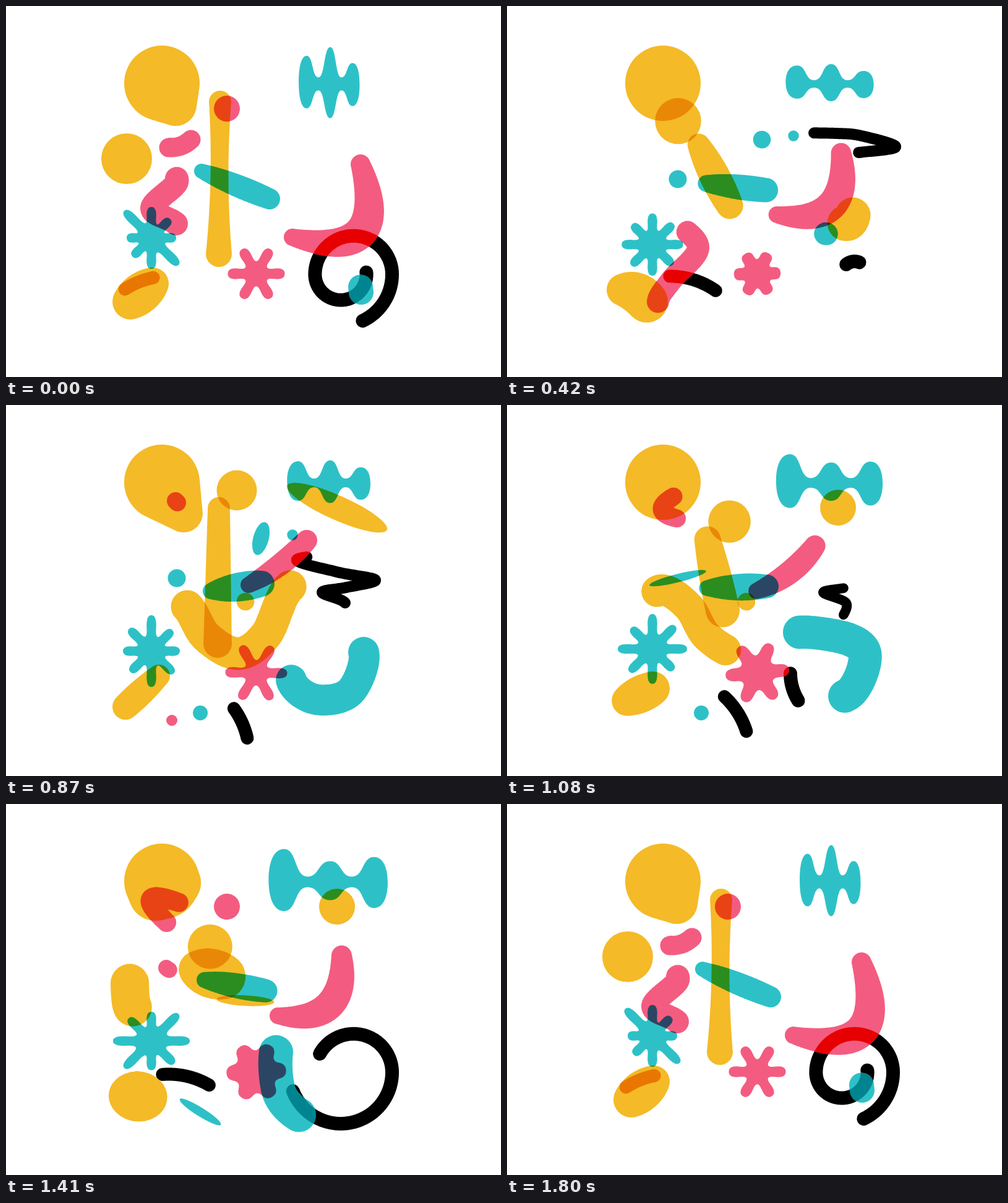
Write an HTML page with a canvas that moves like this. It is 800 px wide and 600 px high and loops after 1.83 s.

```html
<!DOCTYPE html>
<html lang="en">
<head>
<meta charset="utf-8">
<title>Wobbling shapes</title>
<style>
  html, body { margin: 0; width: 100%; height: 100%; overflow: hidden; background: #fff; }
  canvas { display: block; }
</style>
</head>
<body>
<canvas id="stage" width="800" height="600"></canvas>
<script>
const STEP = 30, STEPS = 61, CYCLE = 1800;
const BEATS = [0, 240, 630, 870, 1290, 1560];
const YELLOW = '#f4ba27', PINK = '#f35c80', TEAL = '#2dc1c7';
const { PI, sin, cos, min, max, abs, floor, hypot, exp } = Math;
const RAD = PI / 180;

const stage = document.getElementById('stage').getContext('2d');
const ink = new OffscreenCanvas(800, 600).getContext('2d');
const shapes = [];   // { color, build(path, t) }
const strokes = [];  // { track, pose }

const lerp = (a, b, u) => a + (b - a) * u;
const middle = (a, b) => a.map((v, i) => (v + b[i]) / 2);

// Monotone interpolation of keys [time, ...values]; null outside their life.
function at(keys, t) {
  const last = keys.length - 1;
  if (t < keys[0][0]) t += CYCLE;
  if (t < keys[0][0] || t > keys[last][0]) return null;
  const wraps = keys[last][0] - keys[0][0] === CYCLE;
  let i = 0;
  while (i < last - 1 && keys[i + 1][0] <= t) i++;
  const slope = (j, k) => {
    if (j < 0 || j >= last) {
      if (!wraps) return 0;
      j = (j + last) % last;
    }
    return (keys[j + 1][k] - keys[j][k]) / (keys[j + 1][0] - keys[j][0]);
  };
  const tangent = (j, k) => {
    const a = slope(j - 1, k), b = slope(j, k);
    return a * b <= 0 ? 0 : 2 * a * b / (a + b);
  };
  const a = keys[i], b = keys[i + 1];
  const d = b[0] - a[0], u = (t - a[0]) / d, v = 1 - u;
  return a.slice(1).map((p, n) => {
    const k = n + 1;
    return p * v * v * (1 + 2 * u) + b[k] * u * u * (3 - 2 * u)
      + d * u * v * (v * tangent(i, k) - u * tangent(i + 1, k));
  });
}

const life = (...keys) => t => at(keys, t);

// One pose per beat, repeating for ever.
const cycle = (...poses) =>
  life(...poses.map((p, i) => [BEATS[i], ...p]), [CYCLE, ...poses[0]]);

// Catmull-Rom track through points.
const through = (...pts) => u => {
  const i = max(0, min(floor(u), pts.length - 2)), f = u - i;
  const a = pts[max(i - 1, 0)], b = pts[i], c = pts[i + 1], d = pts[min(i + 2, pts.length - 1)];
  return b.map((p, k) => p + f / 2 * (c[k] - a[k]
    + f * (2 * a[k] - 5 * p + 4 * c[k] - d[k]
    + f * (3 * (p - c[k]) + d[k] - a[k]))));
};

function addDisk(path, x, y, r) {
  if (r <= 0) return;
  path.moveTo(x + r, y);
  path.arc(x, y, r, 0, 7);
}

// Union of disks; spine(u) gives [x, y, r] for u in 0..1.
function addBody(path, spine) {
  for (let i = 0; i <= 56; i++) addDisk(path, ...spine(i / 56));
}

function add(color, pose, build) {
  shapes.push({ color, build(path, t) {
    const v = pose(t);
    if (v) build(path, v);
  } });
}

// Bent bean: two ends with radii, swelling of the middle, sideways bend.
function bean(color, pose) {
  add(color, pose, (path, [x0, y0, r0, x1, y1, r1, belly, bend = 0]) => {
    const k = bend / (hypot(x1 - x0, y1 - y0) || 1);
    const a = [x0, y0, r0], b = [x1, y1, r1];
    const m = [(x0 + x1) / 2 + k * (y1 - y0), (y0 + y1) / 2 - k * (x1 - x0), (r0 + r1) / 2 * belly];
    addBody(path, u => a.map((p, i) =>
      p * (1 - u) * (1 - 2 * u) + 4 * m[i] * u * (1 - u) + b[i] * u * (2 * u - 1)));
  });
}

// Snake on a fixed track; pose: from, to, radius.
function snake(color, track, pose) {
  add(color, pose, (path, [from, to, r]) =>
    addBody(path, u => [...track(lerp(from, to, u)), r]));
}

const crawl = (track, pose) => strokes.push({ track, pose });

// Dot that opens from a thin sliver and closes the same way.
function pop(color, x, y, r, tilt, born, dies) {
  shapes.push({ color, build(path, t) {
    const grow = min(1, (t - born) / 150, (dies - t) / 150);
    if (grow <= 0) {
      if (dies > CYCLE && t + CYCLE < dies) this.build(path, t + CYCLE);
      return;
    }
    path.ellipse(x, y, r * (grow + 2.8 * sin(PI * grow)), r * grow, tilt * RAD, 0, 7);
  } });
}

// Rounded star; the first arm points along rot.
function addStar(path, cx, cy, arms, inner, w, rot) {
  const half = PI / arms.length, ctrl = [];
  arms.forEach((len, i) => {
    const a = rot + 2 * half * i, c = cos(a), s = sin(a);
    const put = (x, y) => [cx + x * c - y * s, cy + x * s + y * c];
    ctrl.push(put(len, -w), put(len, w), put(inner * cos(half), inner * sin(half)));
  });
  path.moveTo(...middle(ctrl.at(-1), ctrl[0]));
  ctrl.forEach((p, i) => path.quadraticCurveTo(...p, ...middle(p, ctrl[(i + 1) % ctrl.length])));
  path.closePath();
}

// Three lobes joined by necks, mirrored top to bottom.
function addComb(path, [spread, outer, inner]) {
  const lobes = [
    { x: 524 - spread, y: 123, h: outer },
    { x: 524, y: 124, h: inner },
    { x: 524 + spread * 0.95, y: 127, h: outer * 0.82 }];
  const neck = 0.105 * (outer + inner);
  let x = lobes[0].x, y = lobes[0].y - outer;
  const wave = (nx, ny) => {
    const h = (nx - x) * 0.55;
    path.bezierCurveTo(x + h, y, nx - h, ny, nx, ny);
    [x, y] = [nx, ny];
  };
  const run = (list, dir) => list.forEach((lobe, i) => {
    if (!i) return;
    wave((x + lobe.x) / 2, 126 + dir * neck);
    wave(lobe.x, lobe.y + dir * lobe.h);
  });
  const side = (width, ny) => {
    const edge = x + width, near = x + width * 0.7, mid = (y + ny) / 2;
    path.bezierCurveTo(near, y, edge, lerp(y, mid, 0.45), edge, mid);
    path.bezierCurveTo(edge, lerp(ny, mid, 0.45), near, ny, x, ny);
    y = ny;
  };
  path.moveTo(x, y);
  run(lobes, -1);
  side(spread * 0.3, lobes[2].y + lobes[2].h);
  // The way back starts at the last lobe, so halve the steps from there.
  run(lobes.reverse(), 1);
  side(-spread * 0.34, lobes[2].y - outer);
  path.closePath();
}

// Large disk whose bulges swell one after another: time, x, y, r
const bulges = [
  [0, 274, 160, 34], [240, 297, 130, 27], [870, 287, 175, 31],
  [1290, 308, 131, 25], [1290, 228, 173, 35]];
shapes.push({ color: YELLOW, build(path, t) {
  addDisk(path, 252, 125, 61);
  for (const [peak, x, y, r] of bulges) {
    const away = (t - peak + CYCLE * 1.5) % CYCLE - CYCLE / 2;
    const swell = exp(-((away / 130) ** 2));
    const tip = [lerp(252, x, swell), lerp(125, y, swell), lerp(50, r, swell)];
    addBody(path, u => [252, 125, 61].map((v, i) => lerp(v, tip[i], u)));
  }
} });

// Yellow: a roaming disk, the snake that becomes it, a bar and an egg
add(YELLOW, life(
  [0, 195, 247, 41], [240, 202, 233, 41], [630, 368, 138, 32.5], [870, 373, 138, 32.5],
  [1290, 339, 239, 36], [1560, 323, 219, 36], [1740, 330, 250, 0]),
  (path, disk) => addDisk(path, ...disk));
snake(YELLOW, through(
  [561, 332], [543, 350], [465, 291], [420, 372], [375, 402],
  [324, 375], [293, 326], [249, 299], [205, 329], [200, 237], [195, 247]),
  life([120, 0, 0, 0], [240, 0, 0, 31], [630, 1, 3.05, 26], [870, 2.1, 6, 26.5],
    [1290, 7, 8, 24], [1560, 9, 9, 41], [1799, 10, 10, 41]));
bean(YELLOW, cycle(
  [346, 155, 18, 344, 401, 21, 0.75], [342, 188, 23, 341, 369, 23, 1.25],
  [273, 253, 12, 384, 284, 20, 1.2], [344, 167, 18, 342, 386, 23, 1],
  [304, 268, 25, 355, 278, 33, 1.15], [322, 266, 35, 344, 283, 40, 1.2]));
const egg = [187, 459, 26, 226, 478, 34, 1.1, 5];
bean(YELLOW, cycle(
  [201, 478, 29, 237, 449, 26, 1.2, 0], egg, egg, [193, 488, 21, 247, 438, 18, 1.1, 0],
  [195, 468, 30, 224, 479, 37, 1.2, 0], [201, 477, 33, 227, 463, 33, 1.18, 0]));

// Pink: elbow, curl, wanderer
const elbow = [566, 250, 16, 456, 367, 14, 1.75, 75];
bean(PINK, cycle(
  [573, 256, 16, 463, 374, 14, 1.75, 75], elbow, [503, 224, 17, 408, 300, 13, 1.35, 13],
  [486, 219, 17, 392, 291, 13, 1.2, 5], [521, 241, 17, 424, 321, 13, 1.4, 19], elbow));
bean(PINK, life(
  [780, 275, 156, 0, 276, 157, 0, 1, 0], [870, 274, 155, 14, 277, 158, 14, 1, 0],
  [1290, 275, 212, 15, 261, 138, 15, 1.1, 42], [1560, 238, 163, 16, 305, 197, 16, 1.05, 35],
  [1800, 263, 229, 15.5, 299, 216, 15.5, 1, -4], [2040, 225, 207, 11.5, 231, 218, 11.5, 1.05, 0],
  [2160, 222, 205, 0, 222, 206, 0, 1, 0]));
snake(PINK, through(
  [259, 265], [276, 285], [236, 327], [275, 352], [309, 392],
  [266, 443], [244, 478], [258, 505], [268, 510]),
  life([1200, 0, 0, 0], [1290, 0, 0, 7], [1560, 0, 1, 17.5], [1800, 0.8, 3, 19],
    [2040, 2, 5, 18.5], [2430, 5.35, 7, 17], [2670, 8, 8, 9], [2760, 8, 8, 0]));

// Teal: slug and a snake turning anticlockwise
const slug = [329, 280, 14, 410, 305, 21, 1.18];
bean(TEAL, cycle(
  [316, 267, 12, 426, 312, 17, 1.25], slug, [313, 294, 13, 429, 291, 18, 1.25],
  [331, 301, 13, 413, 289, 21, 1.35], [315, 288, 12, 427, 300, 17, 1.35], slug));
snake(TEAL, through(
  [574, 463], [561, 391], [510, 368], [474, 388], [461, 445], [500, 476], [556, 464],
  [578, 400], [529, 373], [446, 376], [440, 462], [479, 506], [523, 503], [574, 463], [574, 451]),
  life([0, 0, 0.17, 20], [240, 1, 1, 16], [630, 2.9, 3.4, 22.5], [870, 4, 7, 25],
    [1290, 8, 10, 28], [1560, 11, 12, 26.5], [1799, 13, 14, 20]));

pop(YELLOW, 387, 318, 14.3, 3, 525, 1500);
pop(YELLOW, 535, 166, 29, 24, 768, 1720);
pop(PINK, 357, 166, 21, 110, 1143, 1990);
pop(TEAL, 276, 280, 14.5, -14, 132, 1150);
pop(TEAL, 412, 216, 14.3, 105, 94, 1002);
pop(TEAL, 463, 210, 8.7, 90, 224, 1050);
pop(TEAL, 314, 498, 12, 32, 540, 1500);

// Eight arms: centre height, then lengths of upright, level and diagonal pairs
add(TEAL, cycle(
  [375, 50, 40, 62, 43], [379, 53, 49, 44, 44], [394, 47, 50, 50, 52],
  [398, 58, 46, 51, 48], [388, 53, 66, 46, 59], [378, 41, 53, 61, 64]),
  (path, [cy, up, level, fall, rise]) => {
    const arms = [level, fall, up, rise];
    addStar(path, 235, cy, [...arms, ...arms], 16, 9, 0);
  });

// Six arms: reach, valley, degrees
add(PINK, cycle(
  [46, 12, 0], [37, 22, -9], [40, 13.5, 8], [50, 11, 1], [52, 31, -9], [43, 29, 6]),
  (path, [reach, inner, rot]) =>
    addStar(path, 404.5, 433, Array(6).fill(reach), inner, 10.5, rot * RAD));

// Comb: spread, height of the outer lobes and of the middle one
add(TEAL, cycle(
  [38, 42.5, 57.5], [51, 31, 37], [57, 24.5, 26], [52, 32, 34.5], [81, 51, 27.5], [59, 48, 41.5]),
  addComb);

// Black zigzag
crawl(through(
  [452, 205], [532, 206], [573, 210], [628, 228], [560, 238], [470, 250],
  [535, 270], [597, 283], [550, 295], [511, 303], [548, 320], [541, 345]),
  life([150, 0, 0, 0], [200, 0, 0.5, 9], [240, 0, 1, 9], [630, 2, 7.25, 9],
    [870, 4.7, 10, 9], [1290, 10.8, 11, 5], [1350, 11, 11, 0]));

// Spiral of half circles, u counts the half turns inwards
crawl(u => {
  const k = floor(u), r = 83 - 20.7 * k, a = PI * (1 - u);
  return [541 + 20.7 * (k % 2) + r * cos(a), 434 + r * sin(a)];
}, life(
  [960, 0, 0, 0], [1050, 0, 0.1, 11], [1290, 0.05, 1.27, 11], [1560, 0.26, 2.45, 11],
  [1800, 0.64, 3.05, 11], [2040, 1.42, 3.72, 11], [2280, 3.7, 3.72, 11], [2340, 3.72, 3.72, 0]));

// Pendulum on an arc, longer while it is fast
crawl(a => [263 + 130 * cos(a * RAD), 567 + 130 * sin(a * RAD)], t => {
  const phase = 2 * PI * t / CYCLE;
  const mid = -68 - 44 * cos(phase), half = 11 + 6.5 * abs(sin(phase));
  return [mid - half, mid + half, 10.5];
});

function drawStrokes(ctx, color, t) {
  ctx.strokeStyle = color;
  ctx.lineCap = ctx.lineJoin = 'round';
  for (const { track, pose } of strokes) {
    const v = pose(t);
    if (!v || v[2] < 0.1) continue;
    const [from, to, r] = v;
    ctx.lineWidth = 2 * r;
    ctx.beginPath();
    for (let i = 0; i <= 120; i++) ctx.lineTo(...track(lerp(from, to + 0.001, i / 120)));
    ctx.stroke();
  }
}

function draw(t) {
  const paths = shapes.map(shape => {
    const path = new Path2D();
    shape.build(path, t);
    return { color: shape.color, path };
  });

  stage.globalCompositeOperation = 'source-over';
  stage.fillStyle = '#fff';
  stage.fillRect(0, 0, 800, 600);
  stage.globalCompositeOperation = 'multiply';
  for (const { color, path } of paths) {
    stage.fillStyle = color;
    stage.fill(path);
  }

  // Strokes deepen the colours they cross and stay black elsewhere.
  stage.globalCompositeOperation = 'color-burn';
  drawStrokes(stage, '#808080', t);
  ink.globalCompositeOperation = 'source-over';
  ink.clearRect(0, 0, 800, 600);
  drawStrokes(ink, '#000', t);
  ink.globalCompositeOperation = 'destination-out';
  for (const { path } of paths) ink.fill(path);
  stage.globalCompositeOperation = 'source-over';
  stage.drawImage(ink.canvas, 0, 0);
}

const start = performance.now();
let shown = -1;
function tick() {
  const step = floor((performance.now() - start) / STEP) % STEPS;
  if (step !== shown) {
    shown = step;
    draw(step * STEP % CYCLE);
  }
  requestAnimationFrame(tick);
}
tick();
</script>
</body>
</html>
```
